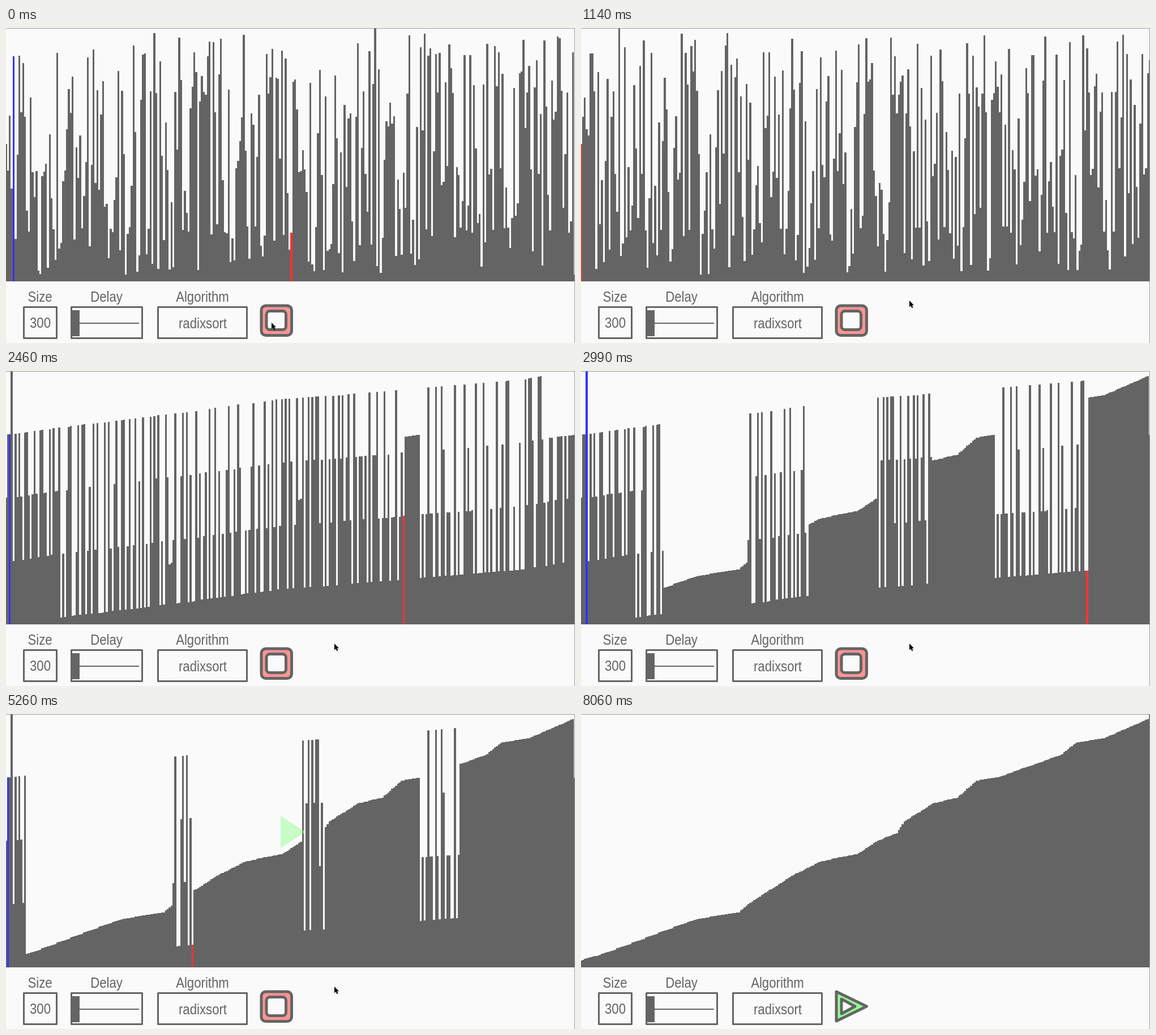
An HTML page with a canvas for the animation above (8430 ms loop, 1005 by 557 pixels).

```html
<!DOCTYPE html>
<html lang="en">
<head>
<meta charset="utf-8">
<title>Radix sort</title>
<style>
html, body { margin: 0; width: 100%; height: 100%; overflow: hidden; background: #fafafa; }
canvas, svg { position: absolute; left: 0; top: 0; }
text { font: 22.2px "Liberation Sans", Arial, sans-serif; fill: #646464; text-anchor: middle; }
.line { fill: none; stroke: #646464; stroke-width: 3; stroke-linejoin: round; }
.icon { stroke: #646464; stroke-width: 5; stroke-linejoin: round; }
</style>
</head>
<body>
<canvas id="stage" width="1005" height="557"></canvas>
<svg width="1005" height="557" viewBox="0 0 1005 557">
  <g class="line">
    <rect x="31.5" y="493.5" width="58" height="55"/>
    <rect x="115.5" y="493.5" width="125" height="55"/>
    <rect x="268.5" y="493.5" width="157" height="55"/>
    <path d="M129 522H235" stroke-width="2"/>
  </g>
  <rect x="116" y="499" width="14" height="46" fill="#646464"/>
  <g transform="scale(1 1.15)">
    <text x="60" y="420.5">Size</text>
    <text x="177.5" y="420.5">Delay</text>
    <text x="347" y="420.5">Algorithm</text>
    <text x="60.5" y="460.5">300</text>
    <text x="347.5" y="461.5">radixsort</text>
  </g>
  <g id="stop" class="icon">
    <rect x="451" y="491" width="53.5" height="52.5" rx="8" fill="#ff9494"/>
    <rect x="460" y="500.5" width="34.5" height="33" rx="6" fill="#fafafa"/>
  </g>
  <g id="play" class="icon">
    <path d="M451 491L504.5 517L451 543Z" fill="#94ff94"/>
    <path d="M460 504L484 517L460 530Z" fill="#fafafa"/>
  </g>
  <path id="resume" d="M485 180L529 208.5L485 237Z" fill="#96ff96" fill-opacity=".5"/>
  <path id="pointer" d="M0 0V11.5L2.6 9L4.4 13.2L6.4 12.3L4.7 8.3H8Z"/>
</svg>
<script>
const LOOP = 8430, N = 300, PITCH = 3.36, FLOOR = 448, UNIT = 1.12;
const WRITE_MS = 4, PASS_STARTS = [-32, 1190, 2410, 3652];
const PAUSE = 3386, RESUME = 5260, DONE = 6726;

// Key points of the sorted curve: [index, value]
const curve = [
  [0, 11], [15, 25], [30, 42], [52, 67], [61, 76], [83, 87], [88, 100], [111, 145],
  [126, 167], [146, 180], [156, 200], [166, 212], [170, 230], [185, 259], [198, 268],
  [208, 295], [219, 300], [252, 335], [260, 354], [276, 363], [298, 392], [299, 400]
];

const clamp01 = u => Math.min(1, Math.max(0, u));
const lerp = (a, b, u) => a + (b - a) * u;

function sortedValue(i) {
  const k = Math.max(1, curve.findIndex(([index]) => index >= i));
  const [i0, v0] = curve[k - 1], [i1, v1] = curve[k];
  return Math.round(lerp(v0, v1, (i - i0) / (i1 - i0)));
}

let seed = 7;
const random = () => (seed = (seed * 16807) % 2147483647) / 2147483647;

function makeBars() {
  const bars = Array.from({ length: N }, (_, i) => sortedValue(i));
  for (let i = N - 1; i > 0; i--) {
    const j = Math.floor(random() * (i + 1));
    [bars[i], bars[j]] = [bars[j], bars[i]];
  }
  return bars;
}

// Performs a number of writes of one decimal pass; reports the next write, if any
function radixPass(bars, power, writes) {
  const from = bars.slice(), ends = Array(10).fill(0);
  const digit = v => Math.floor(v / 10 ** power) % 10;
  from.forEach(v => ends[digit(v)]++);
  for (let d = 1; d < 10; d++) ends[d] += ends[d - 1];
  for (let k = 0; k < N; k++) {
    const v = from[N - 1 - k], bucket = digit(v), slot = --ends[bucket];
    if (k >= writes) return { bucket, slot };
    bars[slot] = v;
  }
}

const initial = makeBars();
const byId = id => document.getElementById(id);
const ctx = byId("stage").getContext("2d");
const edge = i => Math.round(i * PITCH - 1.6);

function drawBar(bars, i, color) {
  const top = Math.round(FLOOR - bars[i] * UNIT);
  ctx.fillStyle = color;
  ctx.fillRect(edge(i), top, edge(i + 1) - edge(i), FLOOR - top);
}

function drawBars(t) {
  const clock = t < PAUSE ? t : Math.max(PAUSE, t - RESUME + PAUSE);
  const bars = initial.slice();
  let next;
  PASS_STARTS.forEach((start, power) => {
    if (clock >= start) next = radixPass(bars, power, Math.floor((clock - start) / WRITE_MS));
  });
  ctx.fillStyle = "#fafafa";
  ctx.fillRect(0, 0, 1005, 557);
  for (let i = 0; i < N; i++) drawBar(bars, i, "#646464");
  if (next) {
    drawBar(bars, next.bucket, "#3333ff");
    drawBar(bars, next.slot, "#ff3333");
  }
  ctx.fillStyle = "#999";
  ctx.fillRect(0, 0, 1005, 1);
  ctx.fillRect(1004, 0, 1, 557);
}

function pointerAt(t) {
  if (t < RESUME) {
    const u = clamp01((t - 60) / 840), s = u * u * (3 - 2 * u);
    return [lerp(469, 580, s), lerp(521, 482, s)];
  }
  const drift = clamp01((t - 5300) / 300), u = clamp01((t - 7000) / 500);
  return [lerp(580, 578, drift) + 104 * u * u, 482 + 76 * u * u];
}

const show = (id, on) => byId(id).style.display = on ? "" : "none";

function frame(now) {
  const t = now % LOOP, [x, y] = pointerAt(t);
  drawBars(t);
  show("stop", t < DONE);
  show("play", t >= DONE);
  show("resume", t >= 3890 && t < 5280);
  show("pointer", t < 7500);
  byId("pointer").setAttribute("transform", `translate(${Math.round(x)} ${Math.round(y)})`);
}

const begin = performance.now();
function tick() {
  frame(performance.now() - begin);
  requestAnimationFrame(tick);
}
tick();
</script>
</body>
</html>
```
